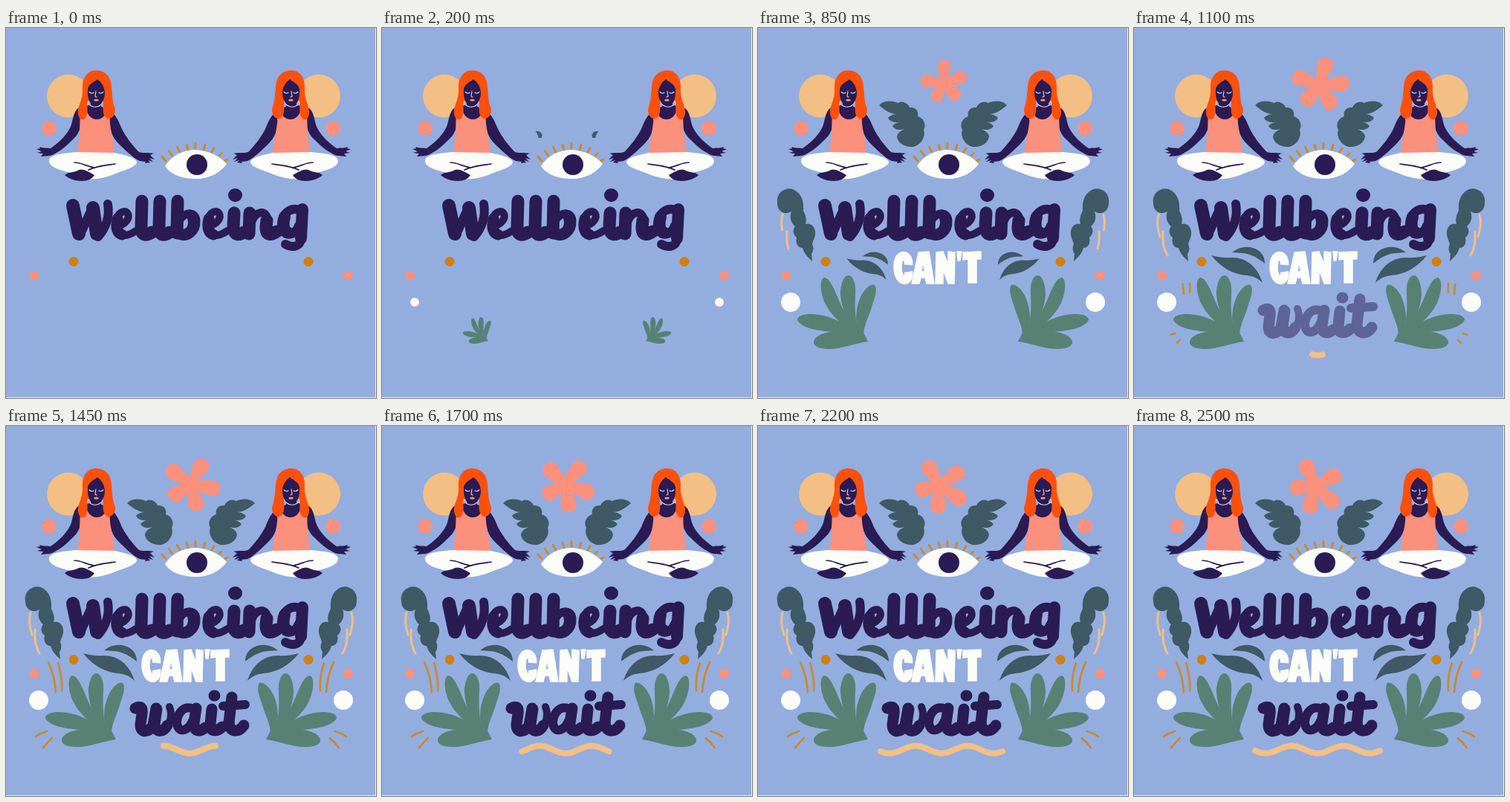
An HTML page that plays this animation: 498 px wide and 498 px high, repeating every 2550 ms.

```html
<!DOCTYPE html>
<html lang="en">
<head>
<meta charset="utf-8">
<title>Wellbeing can't wait</title>
<style>
html, body { margin: 0; width: 100%; height: 100%; overflow: hidden; background: #93addf; }
svg { display: block; width: 100vw; height: 100vh; }
.line { fill: none; stroke-linecap: round; stroke-linejoin: round; }
.navy { fill: #2a1b54; }
.ink { stroke: #2a1b54; }
.slate { fill: #3f5965; }
.green { fill: #588174; }
.pink { fill: #fb907d; }
.peach { fill: #f3bf84; }
.ochre { fill: #cf800f; }
.white { fill: #fcfcf8; }
</style>
</head>
<body>
<svg viewBox="0 0 498 498" role="img" aria-label="Wellbeing can't wait">
  <rect width="498" height="498" fill="#93addf"/>

  <g id="side">
    <circle class="pink" cx="58" cy="135" r="10"/>
    <circle class="pink" cx="37.500" cy="333" r="6.500"/>
    <circle class="ochre" cx="91" cy="314.500" r="6.500"/>
    <circle id="dot" class="white" cx="44" cy="369" r="13"/>
    <path id="topLeaf" class="slate" d="M163 104C168 98 180 97 188 101C194 97 202 101 204 107C212 106 217 112 215 119C223 121 227 130 223 137C226 146 220 157 209 160C198 161 188 155 187 146C188 140 194 138 197 136C190 138 184 137 181 132C184 128 189 127 192 126C186 128 178 127 175 121C178 117 184 116 187 116C180 116 172 112 163 104Z"/>
    <path id="sideLeaf" class="slate" d="M26 236C24 222 36 214 47 217C58 222 62 232 61 246C64 252 66 258 64 264C70 262 76 266 77 274C78 280 74 286 73 291C75 295 75 300 72 304L73 314C68 309 62 304 60 296C54 296 50 290 52 282C47 278 46 272 50 267C44 262 42 254 45 247C42 248 40 250 36 249C30 248 26 243 26 236Z"/>
    <path id="midLeaf" class="slate" d="M104 306C112 308 122 310 132 309C150 309 166 320 173 343C166 336 160 334 152 333C134 332 116 322 104 306ZM132 302C140 295 152 293 160 296C170 299 176 306 176 317C170 312 164 308 158 306C150 302 142 303 132 302Z"/>
    <g id="plant" class="green">
      <path d="M138 418C130 400 130 380 138 362C144 350 152 344 157 346C161 350 158 362 154 372C150 388 143 398 142 412Z"/>
      <path d="M134 412C122 396 112 380 111 358C111 344 116 332 122 333C129 334 132 346 131 358C130 378 131 396 136 410Z"/>
      <path d="M134 412C118 404 100 390 90 370C83 354 83 338 89 336C96 336 102 350 107 362C114 380 124 396 138 412Z"/>
      <path d="M138 416C122 412 110 410 90 408C70 406 54 400 53 392C55 385 70 384 82 386C100 388 120 400 138 412Z"/>
      <path d="M148 422C130 424 115 432 95 432C82 432 74 428 75 422C78 412 95 408 108 409C122 410 136 413 146 418Z"/>
      <path d="M130 406L140 406L147 420L134 418Z"/>
    </g>
    <g class="line" stroke="#f3bf84" stroke-width="3">
      <path class="peachLine" pathLength="1" d="M33 251C30 262 32 272 35 281"/>
      <path class="peachLine" pathLength="1" d="M39 274C38 288 40 298 45 306"/>
    </g>
    <g class="line" stroke="#c98a2c" stroke-width="2.800">
      <path class="ochreLine" pathLength="1" d="M67 358C66 344 63 330 57 318"/>
      <path class="ochreLine" pathLength="1" d="M75 356C76 344 74 331 70 319"/>
      <path class="ochreLine" pathLength="1" d="M55 411Q47 413 40 418"/>
      <path class="ochreLine" pathLength="1" d="M62 420Q55 426 50 433"/>
    </g>
  </g>
  <use href="#side" transform="translate(498) scale(-1 1)"/>

  <g id="woman">
    <circle class="peach" cx="84" cy="91.500" r="29"/>
    <g class="navy">
      <path d="M112 104L99 107C92 110 91 118 88 130C84 142 72 154 60 162C54 161 50 162 45 160L46 162L41 163L48 166L42 168L50 169L47 173C54 172 60 173 66 169C74 165 82 158 89 151C95 146 98 140 101 132L140 134L142 141C144 146 147 151 151 155C160 164 170 174 180 179L188 180L187 182L194 181L191 178L198 180L193 175L200 177L194 171L199 169C192 167 186 169 179 167C170 158 161 146 156 136C151 124 148 116 140 113L129 106Z"/>
      <path d="M114 96H128V113H114Z"/>
    </g>
    <path class="pink" d="M101 108L107 107C110 118 115 123 122 123C130 123 134 117 136 110L140 112C139 122 140 132 142 141C144 150 146 160 146 169L96 168C97 155 99 145 99 137C100 127 99 118 101 108Z"/>
    <path class="white" d="M58 178C60 170 75 169 95 167L146 168C160 171 174 174 176 180C176 187 160 191 150 195C140 200 120 205 108 203C104 201 95 197 84 194C70 191 57 186 58 178Z"/>
    <path class="navy" d="M79 198C84 193 92 195 98 191C104 189 110 193 119 198C116 203 110 206 102 206C94 206 84 203 79 198Z"/>
    <path class="line ink" stroke-width="1.700" d="M92 181C101 181 108 186 119 188M111 191C121 186 132 185 147 183"/>
    <path fill="#fe500d" d="M120 57C108 58 102 69 103 82C104 96 96 105 97 115C98 123 103 126 107 121C112 114 108 105 110 98L131 98C131 107 129 116 135 121C141 125 148 117 147 109C143 100 143 90 142 79C141 64 133 57 120 57Z"/>
    <path class="navy" d="M110 82C112 75 118 73 123 69C129 73 133 80 133 88C133 97 127 105 121 106C114 105 110 96 110 88Z"/>
    <g class="line" stroke="#e7d9e4" stroke-width="1.100">
      <path d="M112 86Q115 89 118 87M125 87Q128 89 131 86M121 85L120 92L122 93M113 104Q121 109 128 103"/>
    </g>
    <ellipse class="pink" cx="121.500" cy="97" rx="3.200" ry="1.500"/>
  </g>
  <use href="#woman" transform="translate(505) scale(-1 1)"/>

  <path class="line" stroke="#c98a2c" stroke-width="3" d="M210 173L215 179M219 165L224 172M230 160L234 167M243 157L245 164M255 155L255 162M268 157L266 164M280 162L276 168M290 169L285 174M298 177L293 180"/>
  <path class="white" d="M214 186C224 170 240 164 256 164C274 165 290 174 297 183C288 196 272 203 256 203C238 203 222 198 214 186Z"/>
  <circle class="navy" cx="257" cy="184" r="14"/>

  <g id="flower" class="pink"></g>

  <g class="line ink">
    <path stroke-width="18" d="M90 239L98 277M117 242L122 277M308 225L309 225"/>
    <path stroke-width="12" d="M99 280L116 242M124 281C134 270 140 254 137 237"/>
    <path stroke-width="10" d="M150 267C161 264 167 256 164 250C161 244 150 247 148 261C147 278 157 285 175 273"/>
    <path stroke-width="15" d="M150 257C147 269 150 276 156 278"/>
    <path stroke-width="17" d="M183 233L182 268C182 280 189 280 196 275M207 233L206 268C206 280 213 280 220 275M231 233L230 276M307 249L306 268C307 280 314 279 320 275M328 249L327 277M351 259L350 268C350 280 357 279 364 274"/>
    <path stroke-width="11" d="M231 278C243 286 257 274 256 259C255 248 243 246 234 258M331 260C337 246 350 244 352 258"/>
    <path stroke-width="15" d="M251 254C255 265 250 275 243 277"/>
    <path stroke-width="10" d="M273 267C284 264 290 256 287 250C284 244 273 247 271 261C270 278 280 285 298 273"/>
    <path stroke-width="15" d="M273 257C270 269 273 276 279 278"/>
    <path stroke-width="12" d="M396 245C382 240 371 251 371 264C371 282 388 282 394 266M397 280C398 294 387 297 376 291"/>
    <path stroke-width="16" d="M375 254C372 266 374 273 379 275M399 244L397 283"/>
  </g>

  <g id="cant" class="white" stroke="#fcfcf8" stroke-width="1.500" stroke-linejoin="round">
    <path fill="none" stroke-width="11.500" d="M202.500 319C204 303 188 301 188 321C188 344 205 344 202.500 328"/>
    <path fill-rule="evenodd" d="M216 302L230 301L237 344L227 344L225 336L219 336L217 344L207 344ZM222 314L220 328L224.500 328Z"/>
    <path d="M240 302L249 301L256 319L256 301L265 302L264 344L256 344L249 325L249 344L239 344ZM268 301L274 301L272 313L269 313ZM276 302L300 301L300 311L294 311L294 343L283 343L283 311L276 312Z"/>
  </g>

  <g id="wait" class="line ink">
    <path stroke-width="15" d="M174 380C182 376 184 380 183 387L181 402C181 414 192 413 198 403L202 380M203 381L200 401C201 413 212 413 217 403"/>
    <path stroke-width="10" d="M214 408C222 400 224 388 220 378"/>
    <path stroke-width="12" d="M252 381C240 375 231 386 230 398C230 415 246 411 251 397M292 377L322 375"/>
    <path stroke-width="15" d="M256 380L253 400C253 412 261 412 268 406M277 381L275 401C275 412 283 412 291 405M304 365L300 399C301 413 313 413 320 403M280 363L281 363"/>
  </g>

  <path id="wave" class="line" stroke="#f3bf84" stroke-width="8"/>
  <path d="M497.500 0V497.500H0" fill="none" stroke="#e4eaf7"/>
</svg>
<script>
const LOOP = 2550, STEP = 50;
const el = id => document.getElementById(id);

// Petals as [angle, length]
el('flower').innerHTML = [[-70, 39], [-3, 42], [57, 38], [128, 33], [203, 37]].map(([a, l]) =>
  `<path transform="rotate(${a})" d="M0-6C${l * .3}-5 ${l * .5}-11 ${l * .76}-11C${l * 1.08}-11 ${l * 1.08} 10 ${l * .78} 10C${l * .5} 10 ${l * .3} 6 0 6Z"/>`
).join('');

// Piecewise linear value through [time, value] pairs
function key(t, ...pts) {
  if (t <= pts[0][0]) return pts[0][1];
  for (let i = 1; i < pts.length; i++) {
    const [t0, v0] = pts[i - 1], [t1, v1] = pts[i];
    if (t <= t1) return v0 + (v1 - v0) * (t - t0) / (t1 - t0);
  }
  return pts[pts.length - 1][1];
}

const show = (node, on) => node.setAttribute('visibility', on ? 'visible' : 'hidden');

function grow(id, x, y, s) {
  show(el(id), s > 0);
  el(id).setAttribute('transform', `translate(${x} ${y}) scale(${s}) translate(${-x} ${-y})`);
}

function trace(cls, v) {
  document.querySelectorAll('.' + cls).forEach(p => {
    show(p, v > 0);
    p.setAttribute('stroke-dasharray', `${v} 2`);
  });
}

function wave(half) {
  show(el('wave'), half > 0);
  let d = '';
  for (let i = 0; i <= 60; i++) {
    const x = half * (i / 30 - 1);
    d += `${i ? 'L' : 'M'}${(247 + x).toFixed(1)} ${(435.5 + 5 * Math.cos(x * Math.PI / 35)).toFixed(1)}`;
  }
  el('wave').setAttribute('d', d);
}

function draw(t) {
  grow('dot', 44, 369, key(t, [50, 0], [200, .46], [550, .96], [650, 1]));
  grow('plant', 140, 421, key(t, [50, 0], [200, .36], [400, .84], [550, .99], [600, 1]));
  grow('topLeaf', 214, 146, key(t, [100, 0], [200, .15], [550, .79], [700, .95], [850, 1]));
  grow('sideLeaf', 76, 309, key(t, [200, 0], [550, .74], [700, .93], [850, 1]));
  grow('midLeaf', 172, 325, key(t, [550, 0], [800, .7], [1000, 1]));
  grow('cant', 241.5, 322.5, key(t, [350, 0], [550, .69], [700, .94], [800, 1]));
  trace('peachLine', key(t, [450, 0], [550, .22], [1050, 1]));
  trace('ochreLine', key(t, [950, 0], [1100, .32], [1400, 1]));

  const s = key(t, [400, 0], [550, .29], [800, .75], [1000, .97], [1100, 1]);
  const turn = key(t, [400, -38], [550, -30], [1100, 0], [1450, 15], [1950, 31], [2550, 47]);
  const x = key(t, [550, 249], [1100, 248], [2500, 243]);
  const y = key(t, [550, 71], [1100, 77], [2500, 80]);
  show(el('flower'), s > 0);
  el('flower').setAttribute('transform', `translate(${x} ${y}) rotate(${turn}) scale(${s})`);

  el('wait').setAttribute('opacity', key(t, [850, 0], [1100, .5], [1350, 1]));
  wave(key(t, [1050, 0], [1100, 7], [1450, 35], [1800, 68], [1950, 77.5], [2150, 82], [2500, 84]));
}

function frame(now) {
  draw(Math.floor(now % LOOP / STEP) * STEP);
  requestAnimationFrame(frame);
}
draw(0);
requestAnimationFrame(frame);
</script>
</body>
</html>
```
